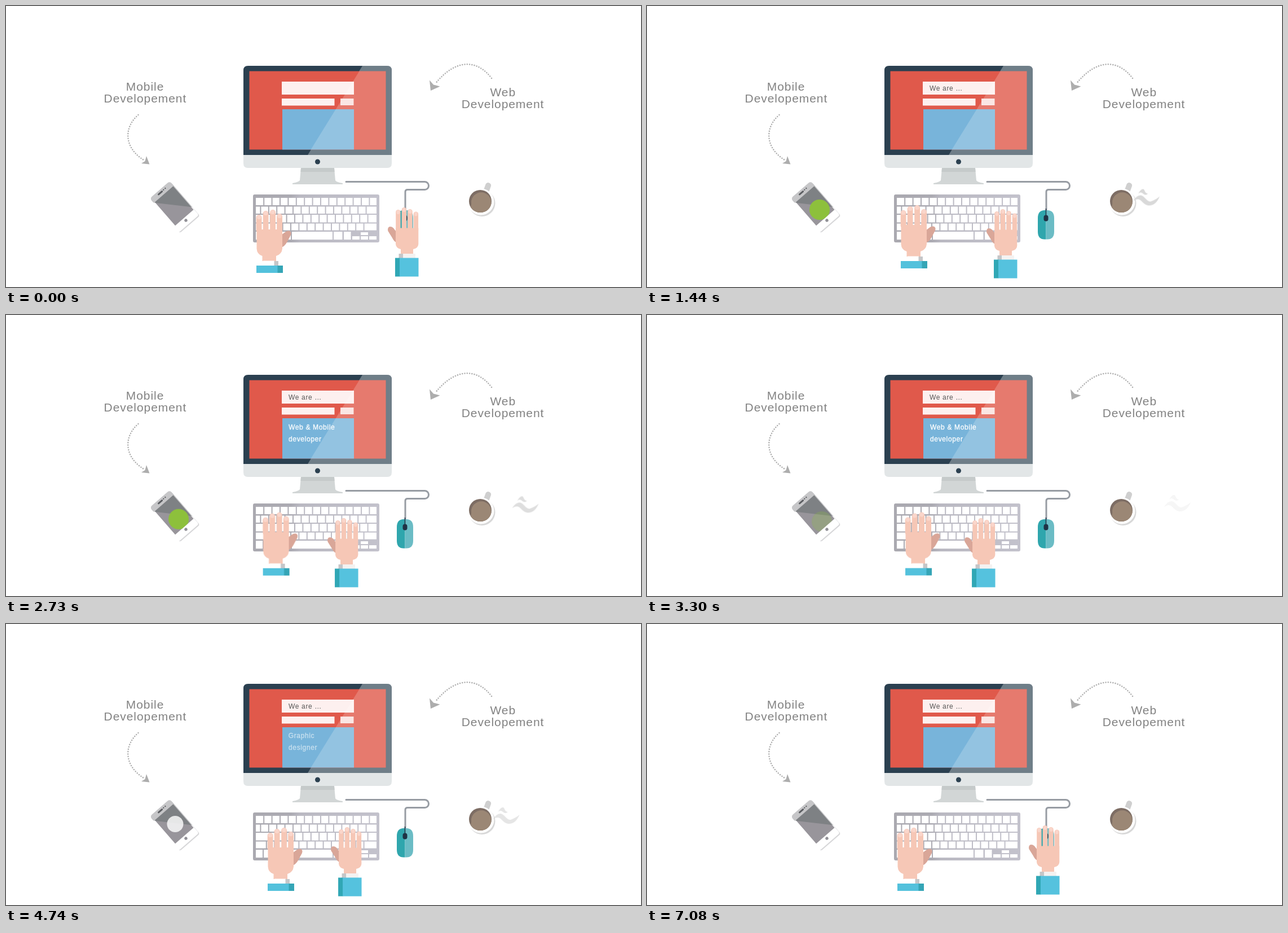
Animation of 1126 by 498 pixels, one loop 7.14 s. Source, as an HTML page:

```html
<!DOCTYPE html>
<html lang="en">
<head>
<meta charset="utf-8">
<title>Developer desk</title>
<style>
html, body { margin: 0; width: 100%; height: 100%; overflow: hidden; background: #fff; }
svg { display: block; width: 1126px; height: 498px; }
text { font-family: "Liberation Sans", Arial, sans-serif; }
.label { font-size: 21px; letter-spacing: .93px; fill: #828282; }
.line { font-size: 12px; letter-spacing: .65px; fill: #fff; stroke: #fff; stroke-width: .3; }
.head { fill: #555; stroke: none; }
.dots { fill: none; stroke: #b0b0b0; stroke-width: 2.6; stroke-linecap: round; stroke-dasharray: 0 4.3; }
.tip { fill: #adadad; }

.move { animation: 7140ms linear infinite; }
#left { animation-name: left; }
#right { animation-name: right; }
#greet { animation-name: greet; }
#web { animation-name: web; }
#graphic { animation-name: graphic; }
#green { animation-name: green; }
#white { animation-name: white; }
#steamA { animation-name: steamA; }
#steamB { animation-name: steamB; }

@keyframes left {
  0%, 1.26% { transform: translate(0, 0); }
  20.17% { transform: translate(6px, -8px); }
  29.83% { transform: translate(9px, -11px); }
  46.22% { transform: translate(14px, -11.5px); }
  66.39% { transform: translate(20px, 0); }
  83.61% { transform: translate(10px, 0); }
  99.16%, 100% { transform: translate(0, 0); }
}
@keyframes right {
  0%, 1.26% { transform: translate(0, 0); }
  10.92% { transform: translate(-25px, 0); }
  20.17% { transform: translate(-75px, 3px); }
  29.83% { transform: translate(-99.5px, 3px); }
  46.22% { transform: translate(-114px, 3px); }
  66.39% { transform: translate(-101px, 3px); }
  83.61% { transform: translate(-89px, 3px); }
  93.3% { transform: translate(-32px, 1.5px); }
  99.16%, 100% { transform: translate(0, 0); }
}
@keyframes greet {
  0%, 4% { opacity: 0; }
  10.92%, 100% { opacity: 1; }
}
@keyframes web {
  0%, 21% { opacity: 0; transform: translateX(-3px); }
  28% { opacity: 1; }
  29.83% { transform: translateX(0); }
  42.02% { transform: translateX(3px); }
  47% { opacity: 1; }
  53%, 100% { opacity: 0; transform: translateX(3px); }
}
@keyframes graphic {
  0%, 63% { opacity: 0; }
  66.39% { opacity: .6; }
  70%, 88% { opacity: 1; }
  96%, 100% { opacity: 0; }
}
@keyframes green {
  0%, 13% { opacity: 0; transform: translate(16px, 18px); }
  18.5% { opacity: 1; }
  20.17% { transform: translate(2px, 2px); }
  26% { transform: translate(-2px, -2px); }
  29.83% { transform: translate(0, 0); }
  42.02% { opacity: 1; transform: translate(3px, 4px); }
  46.22% { opacity: .25; transform: translate(6px, 7px); }
  49%, 100% { opacity: 0; transform: translate(8px, 9px); }
}
@keyframes white {
  0%, 56% { opacity: 0; transform: translate(8px, 9px); }
  66.39% { opacity: .85; transform: translate(0, 0); }
  78%, 93% { opacity: 1; transform: translate(0, 0); }
  98.7%, 100% { opacity: 0; transform: translate(0, 0); }
}
@keyframes steamA {
  0%, 10.5% { opacity: 0; transform: translate(813px, 323px); }
  20.17% { opacity: 1; transform: translate(862px, 321.5px); }
  29.83% { opacity: 1; transform: translate(883px, 320px); }
  42.02% { opacity: .8; transform: translate(904px, 317.5px); }
  46.22% { opacity: .25; transform: translate(917px, 316px); }
  50.42%, 100% { opacity: 0; transform: translate(931px, 315px); }
}
@keyframes steamB {
  0%, 61.8% { opacity: 0; transform: translate(813px, 324px); }
  66.39% { opacity: .68; transform: translate(863.5px, 322px); }
  72.69% { opacity: 1; transform: translate(888px, 320px); }
  83.61% { opacity: 1; transform: translate(932px, 316px); }
  92.86% { opacity: .7; transform: translate(969px, 314px); }
  98.7%, 100% { opacity: 0; transform: translate(974px, 313px); }
}
</style>
</head>
<body>
<svg viewBox="0 0 1126 498">
  <defs>
    <linearGradient id="frame">
      <stop offset="0" stop-color="#aaa9b0"/>
      <stop offset=".3" stop-color="#acabb3"/>
      <stop offset=".37" stop-color="#bab9c2"/>
      <stop offset="1" stop-color="#c3c2cc"/>
    </linearGradient>
    <clipPath id="screenArea"><path transform="translate(299.5 356.5) rotate(-41)" d="M-21-30H22V25H-21Z"/></clipPath>
    <clipPath id="glossArea"><path d="M240 346L331 356.5L331 300H240Z"/></clipPath>
    <g id="steam" fill="#d9d9d9">
      <path d="M0 24Q6 14 13 14C20 14 24 26 31 25Q40 22 47 16Q40 33 27 32C18 31 14 20 8 21Q4 21 0 24Z"/>
      <path d="M9 11Q14 2 18 3C21 4 20 10 26 11Q25 13 21 13C17 12 15 6 9 11Z"/>
    </g>
  </defs>

  <!-- labels -->
  <g class="label">
    <text x="212.8" y="149.5">Mobile</text>
    <text x="173.6" y="170.5">Developement</text>
    <text x="858.5" y="160">Web</text>
    <text x="807.7" y="180.5">Developement</text>
  </g>
  <path class="dots" d="M234.5 193C208.5 215 208.5 252 246 274"/>
  <path class="tip" d="M254.5 280.5L240 279L246.5 275L249 266Z"/>
  <path class="dots" d="M861 128C836 95 798 92 761 138"/>
  <path class="tip" d="M753 150L751 131.5L758 139.5L769.5 142.5Z"/>

  <!-- monitor -->
  <path fill="#d2d6d6" d="M523 287H582L584 309Q585 312 597 314V316H508V314Q519 312 521 309Z"/>
  <path fill="#c5caca" d="M523 287H582L582.6 294H522.4Z"/>
  <path fill="#2b4050" d="M421 264V114Q421 106 429 106H676Q684 106 684 114V264Z"/>
  <path fill="#e2e6e7" d="M421 264H684V279Q684 287 676 287H429Q421 287 421 279Z"/>
  <path fill="#fff" opacity=".32" d="M632 106H676Q684 106 684 114V264H535Z"/>
  <path fill="#e0594b" d="M431.5 115.5H673.5V254.5H431.5Z"/>
  <path fill="#fdf0ef" d="M489 134H617V157H489ZM489 164H582.5V176.5H489Z"/>
  <path fill="#f9e0dd" d="M593 164H616.5V176H593Z"/>
  <path fill="#78b4da" d="M490 183H617V254.5H490Z"/>
  <path fill="#fff" opacity=".195" d="M626.5 115.5H673.5V254.5H540.5Z"/>
  <circle cx="552.5" cy="276" r="4.5" fill="#2b4050"/>
  <text id="greet" class="line head move" x="501" y="150">We are …</text>
  <g id="web" class="line move">
    <text x="499" y="203">Web &amp; Mobile</text>
    <text x="499" y="224">developer</text>
  </g>
  <g id="graphic" class="line move">
    <text x="500.7" y="202">Graphic</text>
    <text x="501" y="222.5">designer</text>
  </g>

  <!-- phone -->
  <g transform="translate(299.5 356.5) rotate(-41)">
    <rect x="-23.5" y="-38" width="47" height="78.5" rx="4" fill="#d6d6d8"/>
    <rect x="-25" y="-41" width="48" height="79.5" rx="4" fill="#fff"/>
  </g>
  <g clip-path="url(#glossArea)">
    <rect transform="translate(299.5 356.5) rotate(-41)" x="-23.5" y="-41" width="47" height="79" rx="5" fill="#c6c6c8"/>
  </g>
  <g transform="translate(299.5 356.5) rotate(-41)">
    <rect x="-21" y="-30" width="43" height="55" fill="#98959b"/>
    <path d="M-7-36H1" stroke="#5c5e62" stroke-width="3" stroke-linecap="round"/>
    <circle cx="5" cy="-36.5" r="1.2" fill="#5c5e62"/>
    <circle cx="9" cy="-36.5" r="1.2" fill="#5c5e62"/>
    <circle cx="-.7" cy="30.5" r="2.7" fill="#929197"/>
  </g>
  <g clip-path="url(#glossArea)">
    <rect transform="translate(299.5 356.5) rotate(-41)" x="-21" y="-30" width="43" height="55" fill="#7e8184"/>
  </g>
  <g clip-path="url(#screenArea)">
    <circle id="green" class="move" cx="304" cy="359" r="18" fill="#8dc03c"/>
    <circle id="white" class="move" cx="300" cy="354.5" r="14.5" fill="#fafafa"/>
  </g>

  <!-- cup -->
  <rect x="849" y="313" width="10" height="18" rx="4.5" fill="#cfcfcf" transform="rotate(20 854 321)"/>
  <circle cx="844" cy="349.5" r="23.5" fill="#d8d8d8"/>
  <circle cx="842" cy="347" r="23.5" fill="#fff"/>
  <circle cx="841" cy="346" r="20" fill="#7d6d64"/>
  <path fill="#9b8775" d="M824.5 357.2A18.5 18.5 0 0 1 860.5 350.5A20 20 0 0 1 824.5 357.2Z"/>
  <circle cx="842.7" cy="348" r="17.7" fill="#9b8775"/>
  <g id="steamA" class="move"><use href="#steam"/></g>
  <g id="steamB" class="move"><use href="#steam"/></g>

  <!-- keyboard -->
  <rect x="438" y="334" width="224" height="85" rx="3" fill="url(#frame)"/>
  <g id="keys" fill="#fff"></g>

  <!-- mouse -->
  <path fill="none" stroke="#979ca3" stroke-width="3" stroke-linecap="round" d="M603 311.5H742.5A7 7 0 0 1 742.5 325.5H712Q708 325.5 708 329.5V362"/>
  <path fill="#2fa6ad" d="M707.5 362V413.5H705Q693 413.5 693 400V376Q693 362 705 362Z"/>
  <path fill="#6bbcc5" d="M707.5 362V413.5H710Q722 413.5 722 400V376Q722 362 710 362Z"/>
  <path stroke="#1f3245" stroke-width="1.5" d="M707.5 359V372"/>
  <rect x="703.5" y="370.5" width="8" height="11" rx="4" fill="#1f3245"/>

  <!-- hands -->
  <g id="left" class="move">
    <path fill="#d9a698" d="M488 406L494.5 401Q497 398 502 398.5Q507 400 505 406L498 419Q494 426 488 428Z"/>
    <g class="fingers" data-tips="443.7 370 455.7 363 468.2 361 480.2 368" data-width="9.8"></g>
    <path fill="#f6c7b6" d="M444.5 396H490V430Q489 440 479 443V452H454.5V443Q445 440 444.5 430Z"/>
    <path fill="#fff" d="M456 451.5H476V460H456Z"/>
    <path fill="#c5c6c8" d="M475.5 452H483V460H475.5Z"/>
    <path fill="#53c1dc" d="M444 460H482V473H444Z"/>
    <path fill="#35a5b6" d="M481.5 460H491V473H481.5Z"/>
  </g>
  <g id="right" class="move">
    <path fill="#d9a698" d="M692 400L687 393.5Q683 390 679 391.5Q676 394 677.5 399L685 411Q687 416 692 419Z"/>
    <g class="fingers" data-tips="691.2 361 701.7 357 712.2 360 722.7 364.5" data-width="8.4"></g>
    <path fill="#f6c7b6" d="M691 393.5H731.3V422Q731 429 722 431V439H700V431Q691.5 429 691 422Z"/>
    <path fill="#c5c6c8" d="M696.5 439H704.5V447H696.5Z"/>
    <path fill="#f4f2f1" d="M704 439H726V447H704Z"/>
    <path fill="#30a7b5" d="M690 446.5H698.5V479.5H690Z"/>
    <path fill="#55c2de" d="M698 446.5H731.5V479.5H698Z"/>
  </g>
</svg>
<script>
const NS = "http://www.w3.org/2000/svg";

function rect(parent, x, y, width, height, more = {}) {
  const el = document.createElementNS(NS, "rect");
  const attrs = { x, y, width, height, ...more };
  for (const name in attrs) el.setAttribute(name, attrs[name]);
  parent.append(el);
}

// Keyboard rows: top, height, width of the first key
const keys = document.getElementById("keys");
const START = 443, END = 657, PITCH = 14.4, GAP = 2;
for (const [y, h, first] of [[340, 13, 15.2], [355.5, 12.5, 9.4], [370, 13.5, 26.8], [385.5, 12, 19.8]]) {
  let x = START, w = first;
  while (x < END - 1) {
    if (END + GAP - x - w < PITCH * .8) w = END + GAP - x;
    rect(keys, x, y, w - GAP, h);
    x += w;
    w = PITCH;
  }
}
for (const [a, b] of [[443, 455], [457, 469], [471, 484], [486, 505], [507, 579], [581, 596.5], [599, 611.5]])
  rect(keys, a, 400, b - a, 14);
for (const x of [614, 629, 644]) rect(keys, x, 408, 13, 6);
rect(keys, 629, 401, 13, 5);

// Fingers with pale nails
for (const hand of document.querySelectorAll(".fingers")) {
  const tips = hand.dataset.tips.split(" ").map(Number);
  const w = Number(hand.dataset.width);
  for (let i = 0; i < tips.length; i += 2) {
    const x = tips[i], y = tips[i + 1];
    rect(hand, x, y, w, 402 - y, { rx: w / 2, fill: "#f6c7b6" });
    rect(hand, x + 1.3, y + .5, w - 2.6, 7.5, { rx: 3, fill: "#fad6cb" });
  }
}
</script>
</body>
</html>
```
